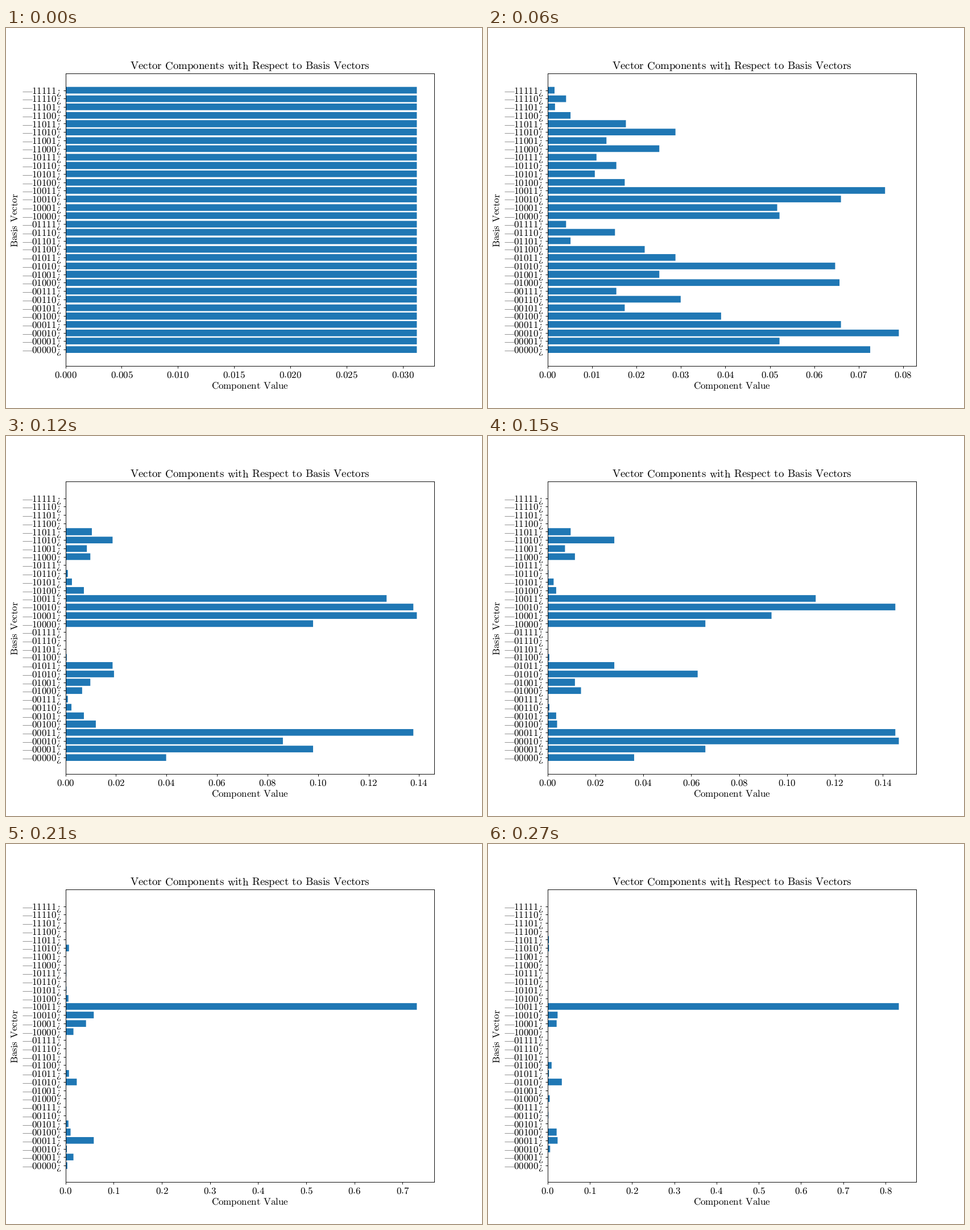
A matplotlib script for the animation above (300 ms loop, 837 by 669 pixels).

```python
import math

import matplotlib.pyplot as plt
import numpy as np
from matplotlib.animation import FuncAnimation
from matplotlib.lines import Line2D
from matplotlib.ticker import MaxNLocator

W, H, DPI = 837, 669, 96
PT = 72 / DPI               # points per pixel
TEXT, TITLE = 17 * PT, 18.95 * PT
STEPS, STATES = 10, 32
Y_TOP, Y_SPAN = 32.99, 34.98

plt.rcParams.update({
    "mathtext.fontset": "cm",
    "text.hinting": "none",
    "axes.linewidth": 0.93 * PT,
})

# Log-weights at key steps. Bits are a b c d e, with a and e alike:
#   a, b, c, d, ae, ab, ad, bd, c with a or b, cd
KEYS = {
    0: [0] * 10,
    1: [-.03, -.12, -.67, .09, -.12, -.41, -.05, -.25, -.4, 0],
    3: [-.63, -.08, -.57, .08, .76, -.85, .35, .05, -.56, -.7],
    4: [.9, -1.8, -1.2, .77, -.55, -.5, -.43, .3, -1.4, -2.4],
    5: [.6, -.95, -2.2, 1.4, -.25, -.8, -.61, .1, -.7, -3],
    7: [1.45, -1.1, 1, -.3, -.5, -4.2, 1.57, 3.2, -2, -3],
    9: [.9, 2.6, 4, 2.75, 2.2, -3.6, .45, -.9, -3.4, -5],
}

a, b, c, d, e = (np.arange(STATES) >> np.arange(4, -1, -1)[:, None]) & 1
ends = a + e
features = np.array([ends, b, c, d, a * e, ends * b, ends * d,
                     b * d, c * (ends + b), c * d])


def distribution(step):
    """Probability of each state from the interpolated log-weights."""
    weights = [np.interp(step, list(KEYS), w) for w in zip(*KEYS.values())]
    p = np.exp(weights @ features)
    return p / p.sum()


def roman(text):
    return r"$\mathrm{%s}$" % text.replace(" ", r"\hspace{0.38}")


fig, ax = plt.subplots(figsize=(W / DPI, H / DPI), dpi=DPI)
fig.set_facecolor("white")


def label(x, y, text, size=TEXT, ha="center", rotation=0):
    """Put text at a pixel position, y being its baseline from the top."""
    fig.text(x / W, 1 - y / H, roman(text), fontsize=size, ha=ha,
             va="baseline", rotation=rotation, rotation_mode="anchor")


def on_grid(y):
    """Round a bar edge to the rows of an 800 pixel high canvas."""
    unit = 0.77 * 800 / Y_SPAN
    return Y_TOP - np.round((Y_TOP - y) * unit) / unit


rows = np.arange(STATES)
low, high = on_grid(rows - 0.4), on_grid(rows + 0.4)
bars = ax.barh(low, distribution(0), height=high - low, align="edge",
               color="#1f77b4", snap=False)
ax.set_ylim(Y_TOP - Y_SPAN, Y_TOP)
ax.set_yticks(rows, [""] * STATES)
ax.tick_params(length=4.07 * PT, width=0.93 * PT)
ax.tick_params(axis="x", pad=16.5 * PT, labelsize=TEXT)

label(429, 73.4, "Vector Components with Respect to Basis Vectors", TITLE)
label(429, 636, "Component Value")
label(21, 337.8, "Basis Vector", rotation=90)

row_height = 0.77 * H / Y_SPAN
for s in rows:
    base = round(0.12 * H + (Y_TOP - s) * row_height + 6.05)
    label(45, base, format(s, "05b"), ha="left")
    label(98, base - 8.6, "?", ha="left", rotation=180)
    dash_y = 1 - (base - 4.5) / H
    fig.add_artist(Line2D([29 / W, 46 / W], [dash_y, dash_y],
                          lw=PT, color="0.58", solid_capstyle="butt"))

locator = MaxNLocator(9, steps=[1, 2, 2.5, 5, 10])


def update(step):
    values = distribution(step)
    for bar, v in zip(bars, values):
        bar.set_width(v)
    limit = values.max() * 1.05
    ticks = [t for t in locator.tick_values(0, limit) if -1e-9 <= t <= limit]
    digits = math.ceil(-math.log10(ticks[1] - ticks[0]) - 1e-6)
    ax.set_xticks(ticks, [roman(f"{abs(t):.{digits}f}") for t in ticks])
    for text in ax.get_xticklabels():
        text.set_va("baseline")
    ax.set_xlim(0, limit)
    return list(bars)


anim = FuncAnimation(fig, update, frames=STEPS, interval=30,
                     repeat=True, repeat_delay=0, blit=False)
plt.show()
```
